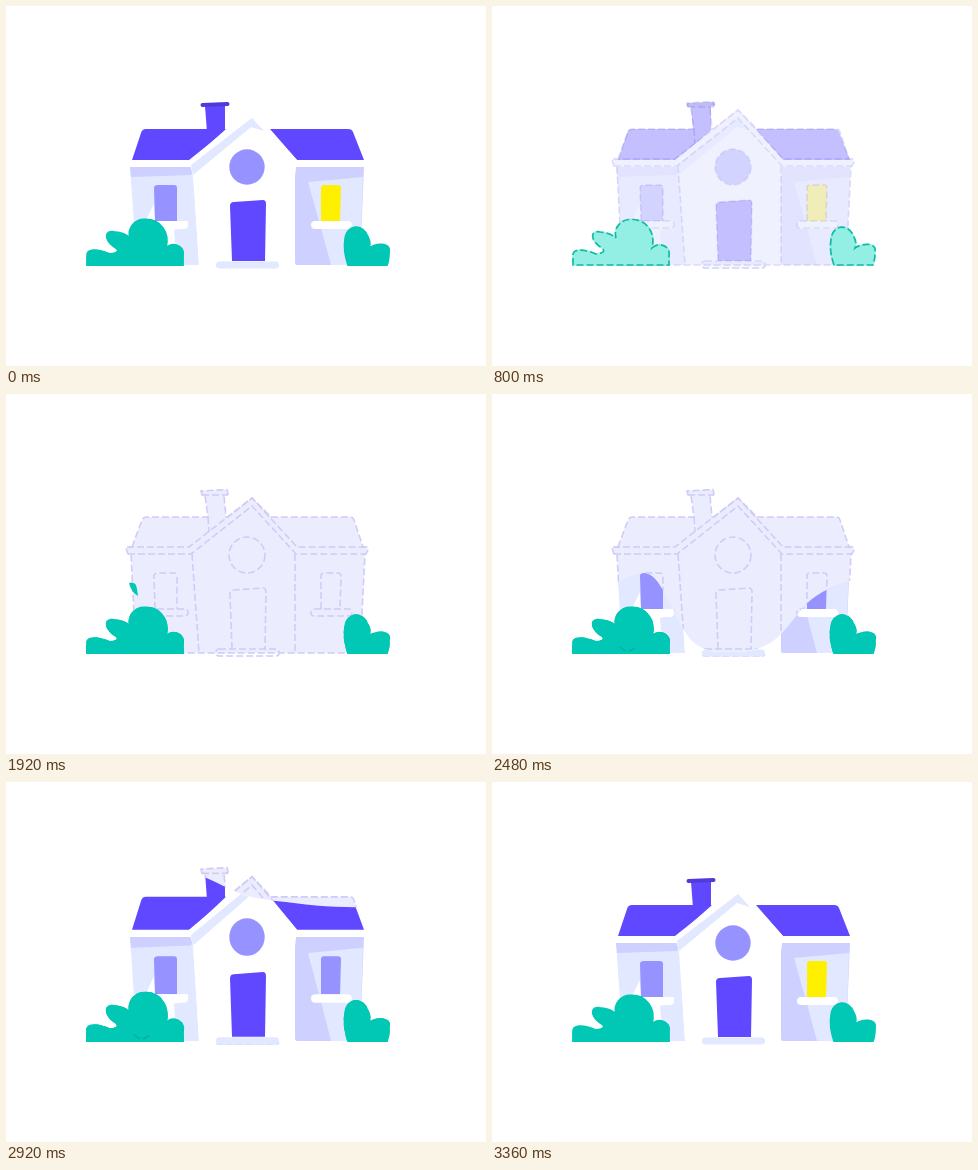
An HTML page that plays this animation: 480x360 px, repeating every 3480 ms.

```html
<!DOCTYPE html>
<html lang="en">
<head>
<meta charset="utf-8">
<title>House being filled in</title>
<style>
html, body { margin: 0; width: 100%; height: 100%; overflow: hidden; background: #fff; }
svg { display: block; width: 480px; height: 360px; }
.line { fill: none; stroke: #d0ccf6; stroke-width: 1.6; stroke-dasharray: 7 3; }
.deep { fill: #5f48ff; }
.mid { fill: #9692ff; }
.lilac { fill: #ced0ff; }
.pale { fill: #e1e8ff; }
.white { fill: #fff; }
.teal { fill: #00c8b4; }
.dashed { fill: #ccfff6; stroke: #15b8a2; stroke-width: 1.7; stroke-dasharray: 7 3; }
</style>
</head>
<body>
<svg viewBox="0 0 480 360">
  <defs>
    <path id="outline" d="M126 153L136 126Q137 123 141 123H202L199 102 196 101 195 97 221 95.5 222 100 218 102 220 123H222L246 104 265 123H344Q347 123 348 126L357 153H361L362 156 360 160H359L354 259H130L125 160H122L120 154Z"/>
    <path id="bushes" d="M81 259V250C80 243 90 242 104 248C112 247 115 245 107 240C98 233 99 224 108 226Q119 227 124 232C121 222 129 213 139 213.500C154 213 164 226 160 242C167 235 179 240 177 250L177 259Z M342 259C338 247 338 240 339 234C340 218 357 217 362 231Q365 237 363 242C370 237 385 236 383 246Q383 254 381 259Z"/>
    <clipPath id="houseClip"><path id="houseWave"/></clipPath>
    <clipPath id="bushClip"><path id="bushWave"/></clipPath>
  </defs>
  <g id="scene">
    <g class="sketch">
      <use href="#outline" fill="#ebedff"/>
      <use href="#outline" class="line"/>
      <g class="line">
        <path d="M121 153H183L246 104 291 153H361M122 160H185L246 112 290 160H360M202 123L203 138M196 101H222M186 160L193 259M289 160V259"/>
        <circle cx="241" cy="161" r="18"/>
        <path d="M226 255L224 200Q224 196 228 196L257 194Q260 194 260 198L259 255"/>
        <path d="M149 215L148 182Q148 179 152 179H168Q171 179 171 182V215M315 215V182Q315 179 318 179H332Q335 179 335 182L334 215"/>
        <rect x="138" y="215" width="44" height="7" rx="3"/>
        <rect x="305" y="215" width="41" height="7" rx="3"/>
        <rect x="210" y="255" width="63" height="7" rx="3"/>
      </g>
    </g>
    <g clip-path="url(#houseClip)">
      <g class="full">
        <use href="#outline" fill="#fff" stroke="#fff" stroke-width="3"/>
        <!-- left wing -->
        <path class="pale" d="M124 161H187L193 259H131Z"/>
        <path class="lilac" d="M124 161H187V164L185 169 125 171Z"/>
        <path class="white" d="M136 222L148 198 149 215H182V221L168 224 169 237 177 241 160 250Z"/>
        <path class="mid" d="M149 215L148 182Q148 179 152 179H168Q171 179 171 182V215Z"/>
        <rect class="white" x="138" y="215" width="44" height="8" rx="4"/>
        <!-- right wing -->
        <path class="lilac" d="M289 161H358L354 257Q354 259 350 259H291Q289 259 289 257Z"/>
        <path class="pale" d="M302 176L357 171 354 259H325L315 222Z"/>
        <path class="mid" id="lamp" d="M315 215V182Q315 179 318 179H332Q335 179 335 182L334 215Z"/>
        <rect class="white" x="305" y="215" width="41" height="8" rx="4"/>
        <!-- roof and chimney -->
        <path class="deep" d="M126 154L135 127Q136 123 140 123H220L185 154ZM264 123H342Q346 123 347 126L358 154H291ZM199 100H219V124L202 139Z"/>
        <path d="M196.500 99L221.500 98" stroke="#4f3bd8" stroke-width="4" stroke-linecap="round"/>
        <!-- gable -->
        <path class="white" d="M183 154L246 104 291 154 289 170V259H193L187 170Z"/>
        <path class="pale" d="M185 159L246 112 258 125 245 121 187 169Z"/>
        <circle class="mid" cx="241" cy="161" r="17.700"/>
        <path class="deep" d="M226 255L224 200Q224 196 228 196L257 194Q260 194 260 198L259 255Z"/>
        <rect class="pale" x="210" y="255.500" width="63" height="7" rx="3.500"/>
      </g>
    </g>
    <use href="#bushes" class="sketch dashed"/>
    <g clip-path="url(#bushClip)">
      <g class="full">
        <use href="#bushes" class="teal" stroke="#00c8b4" stroke-width="1.800"/>
        <path id="crease" d="M128 253Q135 261 144 253" fill="none" stroke="#04ae9e" stroke-width="1.500" stroke-dasharray="7 3"/>
      </g>
    </g>
  </g>
  <path id="leafDrop" class="teal" d="M-4 -6Q3 -8 4 0L5 7Q-2 3 -4 -6Z"/>
  <path id="roofDrop" class="deep" d="M-3 -5Q3 -6 3 0L3 6Q-3 3 -3 -5Z"/>
</svg>
<script>
const LOOP = 3480, STEP = 40;
const $ = id => document.getElementById(id);
const each = (name, fn) => document.querySelectorAll(name).forEach(fn);
const flat = y => Array(9).fill(y);

// Each key is [time, values]; surface heights stand 40 px apart from x = 80.
const bushKeys = [
  [1280, flat(266)],
  [1480, [285, 249, 233, 242, 258, 260, 262, 251, 232]],
  [1640, [240, 230, 225, 230, 235, 240, 235, 232, 226]],
  [1800, flat(190)]
];
const houseKeys = [
  [2240, flat(268)],
  [2480, [215, 191, 182, 247, 258, 248, 205, 186, 178]],
  [2640, [185, 176, 180, 205, 206, 190, 174, 170, 180]],
  [2800, [120, 130, 145, 150, 140, 138, 145, 150, 152]],
  [2920, [85, 85, 92, 105, 122, 128, 132, 133, 133]],
  [3080, flat(60)]
];
const stretchKeys = [[2800, [1]], [2920, [1.06]], [2960, [1.06]], [3080, [0.985]], [3200, [1]]];

function sample(keys, t) {
  const i = keys.findIndex(k => k[0] > t);
  if (i < 0) return keys[keys.length - 1][1];
  if (i === 0) return keys[0][1];
  const [t0, a] = keys[i - 1], [t1, b] = keys[i];
  const u = (t - t0) / (t1 - t0);
  return a.map((v, j) => v + (b[j] - v) * u);
}

// Smooth liquid surface closed along the bottom of the stage
function wave(ys) {
  const at = i => ys[Math.max(0, Math.min(8, i))];
  let d = `M80 ${ys[0]}`;
  for (let i = 0; i < 8; i++) {
    const x = 80 + i * 40;
    d += `C${x + 13.3} ${at(i) + (at(i + 1) - at(i - 1)) / 6} ` +
      `${x + 26.7} ${at(i + 1) - (at(i + 2) - at(i)) / 6} ${x + 40} ${at(i + 1)}`;
  }
  return d + 'V360H0V' + ys[0] + 'Z';
}

function toss(id, t, start, end, x, base, rise) {
  const u = (t - start) / (end - start);
  const shown = u > 0 && u < 1;
  $(id).setAttribute('visibility', shown ? 'visible' : 'hidden');
  if (shown) $(id).setAttribute('transform', `translate(${x} ${base - rise * 4 * u * (1 - u)})`);
}

function draw(t) {
  const fading = t < 1280;
  const fade = Math.max(0, Math.min(1, (t - 480) / 440));
  each('.full', g => g.setAttribute('opacity', fading ? 1 - fade : 1));
  each('.sketch', g => g.setAttribute('visibility', t >= 480 && t < 3200 ? 'visible' : 'hidden'));
  $('houseWave').setAttribute('d', wave(fading ? flat(0) : sample(houseKeys, t)));
  $('bushWave').setAttribute('d', wave(fading ? flat(0) : sample(bushKeys, t)));
  const s = sample(stretchKeys, t)[0];
  $('scene').setAttribute('transform', `translate(0 ${260 * (1 - s)}) scale(1 ${s})`);
  $('lamp').style.fill = t < 1280 || t >= 3080 ? '#fff000' : '';
  $('crease').setAttribute('visibility', t >= 2400 && t < 3000 ? 'visible' : 'hidden');
  toss('leafDrop', t, 1760, 2040, 127, 220, 25.5);
  toss('roofDrop', t, 2920, 3160, 210, 94, 34);
}

function tick() {
  const t = performance.now() % LOOP;
  draw(Math.floor(t / STEP) * STEP);
  requestAnimationFrame(tick);
}
tick();
</script>
</body>
</html>
```
